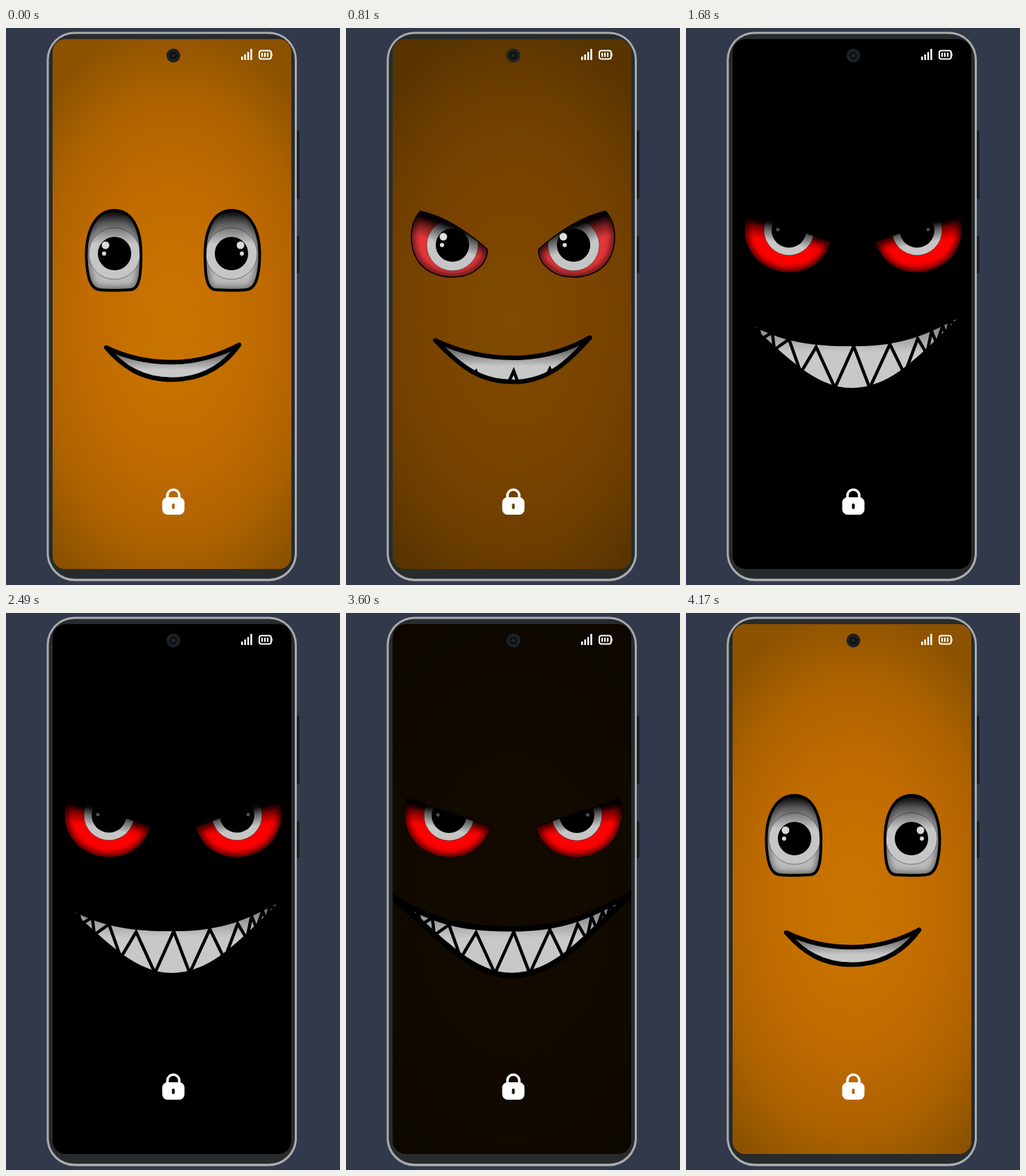
An HTML page for the animation above (4200 ms loop, 480x800 px).

```html
<!DOCTYPE html>
<html lang="en">
<head>
<meta charset="utf-8">
<title>Lock screen face</title>
<style>
  html, body { margin: 0; height: 100%; overflow: hidden; background: #32394b; }
  svg { display: block; width: 100vw; height: 100vh; }
</style>
</head>
<body>
<svg viewBox="0 0 480 800">
  <defs>
    <radialGradient id="skin" gradientUnits="userSpaceOnUse" cx="0" cy="0" r="430"
      gradientTransform="translate(240 420) scale(.62 1)">
      <stop offset="0" stop-color="#c87600"/>
      <stop offset=".25" stop-color="#c67000"/>
      <stop offset=".5" stop-color="#be6a00"/>
      <stop offset=".75" stop-color="#ad6200"/>
      <stop offset="1" stop-color="#8c5200"/>
    </radialGradient>
    <linearGradient id="browShade" gradientUnits="userSpaceOnUse">
      <stop offset="0" stop-opacity=".97"/>
      <stop offset=".4" stop-opacity=".5"/>
      <stop offset="1" stop-opacity="0"/>
    </linearGradient>
    <linearGradient id="lipShade" gradientUnits="userSpaceOnUse" x1="0" x2="0">
      <stop offset="0" stop-opacity=".65"/>
      <stop offset="1" stop-opacity="0"/>
    </linearGradient>
    <filter id="soft" filterUnits="userSpaceOnUse" x="60" y="240" width="180" height="160">
      <feGaussianBlur stdDeviation="3.500"/>
    </filter>
    <clipPath id="screen"><rect x="67" y="16" width="343" height="761" rx="18"/></clipPath>
    <path id="eyeShape"/>
    <path id="mouthShape"/>
    <clipPath id="eyeClip"><use href="#eyeShape"/></clipPath>
    <clipPath id="mouthClip"><use href="#mouthShape"/></clipPath>
  </defs>

  <g fill="#191d22">
    <rect x="415" y="147" width="6.500" height="99" rx="2"/>
    <rect x="415" y="299" width="6.500" height="53" rx="2"/>
  </g>
  <rect x="58.500" y="5.500" width="359.500" height="789" rx="40" fill="#a9abad"/>
  <rect x="61.500" y="8.500" width="353.500" height="782.500" rx="37" fill="#272b2c"/>

  <g clip-path="url(#screen)">
    <rect x="67" y="16" width="343" height="761" fill="url(#skin)"/>
    <rect id="night" x="67" y="16" width="343" height="761"/>

    <g id="eyes"></g>

    <g clip-path="url(#mouthClip)">
      <use href="#mouthShape" fill="#c8c8c8"/>
      <path id="teeth" fill="none" stroke="#000" stroke-width="4.500" stroke-linejoin="miter"
        d="M86 421L96 426 97 434 104 431 108 447 124 437 127 462 148 447 165 495 187 458
           214 517 241 457 264 517 293 454 314 497 333 446 346 468 353 435 360 453 369 428
           374 441 379 422 389 424 391 417"/>
      <use href="#mouthShape" fill="url(#lipShade)"/>
    </g>
    <use id="lips" href="#mouthShape" fill="none" stroke="#000" stroke-linejoin="round"/>
  </g>

  <circle cx="240.500" cy="39.500" r="10" fill="#1e2123"/>
  <circle cx="240.500" cy="39.500" r="5.500" fill="#0c1013"/>
  <circle cx="240.500" cy="39.500" r="2.500" fill="#20282e"/>

  <g fill="#fff">
    <path d="M338 41h2.500v5H338zM342.400 38h2.500v8h-2.500zM346.800 34.500h2.500V46h-2.500zM351.200 30h2.500v16h-2.500z"/>
    <path d="M367 35.500h2.200v6H367zM371 35.500h2.200v6H371zM375 35.500h2.200v6H375zM381 35.500q2 0 2 3t-2 3z"/>
    <rect x="364" y="32.500" width="17" height="12" rx="3" fill="none" stroke="#fff" stroke-width="2"/>
    <path d="M232 676v-4.500a8.500 8.500 0 0 1 17 0v4.500" fill="none" stroke="#fff" stroke-width="3.600"/>
    <path fill-rule="evenodd" d="M232 674h17a7.500 7.500 0 0 1 7.500 7.500v10a7.500 7.500 0 0 1-7.500 7.500h-17
      a7.500 7.500 0 0 1-7.500-7.500v-10a7.500 7.500 0 0 1 7.500-7.500zM240.500 683a2 2 0 0 0-2 2v4a2 2 0 0 0 4 0v-4a2 2 0 0 0-2-2z"/>
  </g>
</svg>

<script>
const LOOP = 4200, DARKEN_AT = 600, BRIGHT_AT = 4083, TAU = 311;
const ANGRY = 0.366; // darkness at which the middle pose is reached
const $ = id => document.getElementById(id);

// Every value is a string of numbers, so all parts blend the same way.
const poses = [
  { // happy
    eye: 'M116 340C112 290 130 262 156 262C182 262 194 290 194 325C194 355 192 376 178 376C165 377 140 377 135 376C122 375 118 360 116 340Z',
    mouth: 'M144 459C175 474 205 480 238 480C272 480 305 471 335 455C312 487 280 505 238 505C196 505 168 487 144 459Z',
    white: 'rgb(186,186,186)', line: '4', iris: '156 324 37 24',
    glints: ['143 312 5.5 141 324 3', '143 312 5.5 141 324 3'], glow: '.85',
    shade: '156 262 156 310', edge: '.35', lip: '460 491 6.500', teeth: '60'
  },
  { // angry
    eye: 'M94 300C94 285 99 272 107 263C140 270 175 292 203 318C204 325 200 338 190 345C175 360 148 360 130 354C105 346 94 325 94 300Z',
    mouth: 'M129 449C165 466 200 474 240 474C280 474 315 465 350 445C315 485 285 509 239 508C193 508 165 487 129 449Z',
    white: 'rgb(228,54,58)', line: '1.600', iris: '153 312 37 24',
    glints: ['140 300 5.5 138 312 3', '168 300 5.5 166 312 3'], glow: '.88',
    shade: '156 286 146 314', edge: '.5', lip: '454 486 6.500', teeth: '36'
  },
  { // scary
    eye: 'M84 290C84 281 85 273 87 266C127 279 168 293 208 307C204 320 196 332 185 340C165 354 135 354 115 342C96 332 84 312 84 290Z',
    mouth: 'M64 406C120 440 160 454 240 453C320 454 355 430 412 402C340 470 300 521 238 521C176 521 130 460 64 406Z',
    white: 'rgb(252,0,0)', line: '1', iris: '148 290.5 36 25',
    glints: ['133 280 0 132 289.5 2.500', '133 280 0 132 289.5 2.500'], glow: '.3',
    shade: '147 284 142 310', edge: '.6', lip: '395 466 8', teeth: '0'
  }
];

const nums = s => s.match(/[\d.]+/g).map(Number);

function blend(a, b, k) {
  if (Array.isArray(a)) return a.map((s, i) => blend(s, b[i], k));
  const to = nums(b);
  let i = 0;
  return a.replace(/[\d.]+/g, n => (+n + (to[i++] - n) * k).toFixed(2));
}

function poseAt(dark) {
  const early = dark < ANGRY;
  const x = early ? dark / ANGRY : (dark - ANGRY) / (1 - ANGRY);
  const k = early ? x : 1 - (1 - x) ** 2;
  const [a, b] = early ? poses : poses.slice(1);
  const pose = {};
  for (const key in a) pose[key] = blend(a[key], b[key], k);
  return pose;
}

$('eyes').innerHTML = ['', 'translate(480 0) scale(-1 1)'].map(side => `
  <g transform="${side}">
    <g clip-path="url(#eyeClip)">
      <use class="white" href="#eyeShape"/>
      <use class="edge" href="#eyeShape" fill="none" stroke="#000" stroke-width="12" filter="url(#soft)"/>
      <circle class="iris" fill="#c6c6c6" stroke="#000" stroke-opacity=".4"/>
      <circle class="pupil"/>
      <use href="#eyeShape" fill="url(#browShade)"/>
      <g class="glints" fill="#fff"><circle/><circle/></g>
    </g>
    <use class="line" href="#eyeShape" fill="none" stroke="#000" stroke-linejoin="round"/>
  </g>`).join('');
const eyes = [...$('eyes').children];

function set(el, names, values) {
  names.split(' ').forEach((name, i) => el.setAttribute(name, values[i]));
}

function darkness(t) {
  const gap = t < LOOP / 2 ? t - DARKEN_AT : BRIGHT_AT - t;
  return gap > 0 ? 1 - Math.exp(-((gap / TAU) ** 2)) : 0;
}

function draw(t) {
  const dark = darkness(t), pose = poseAt(dark);
  $('night').setAttribute('opacity', dark);
  $('eyeShape').setAttribute('d', pose.eye);
  $('mouthShape').setAttribute('d', pose.mouth);
  set($('browShade'), 'x1 y1 x2 y2', nums(pose.shade));
  set($('lipShade'), 'y1 y2', nums(pose.lip));
  $('lips').setAttribute('stroke-width', nums(pose.lip)[2]);
  $('teeth').setAttribute('transform', `translate(0 ${pose.teeth})`);

  const [x, y, outer, inner] = nums(pose.iris);
  eyes.forEach((eye, side) => {
    const part = name => eye.querySelector('.' + name);
    part('white').setAttribute('fill', pose.white);
    part('edge').setAttribute('opacity', pose.edge);
    part('line').setAttribute('stroke-width', pose.line);
    set(part('iris'), 'cx cy r', [x, y, outer]);
    set(part('pupil'), 'cx cy r', [x, y, inner]);
    const glints = part('glints'), spots = nums(pose.glints[side]);
    glints.setAttribute('opacity', pose.glow);
    set(glints.children[0], 'cx cy r', spots.slice(0, 3));
    set(glints.children[1], 'cx cy r', spots.slice(3));
  });
}

const start = performance.now();
function tick() {
  draw((performance.now() - start) % LOOP);
  requestAnimationFrame(tick);
}
tick();
</script>
</body>
</html>
```
